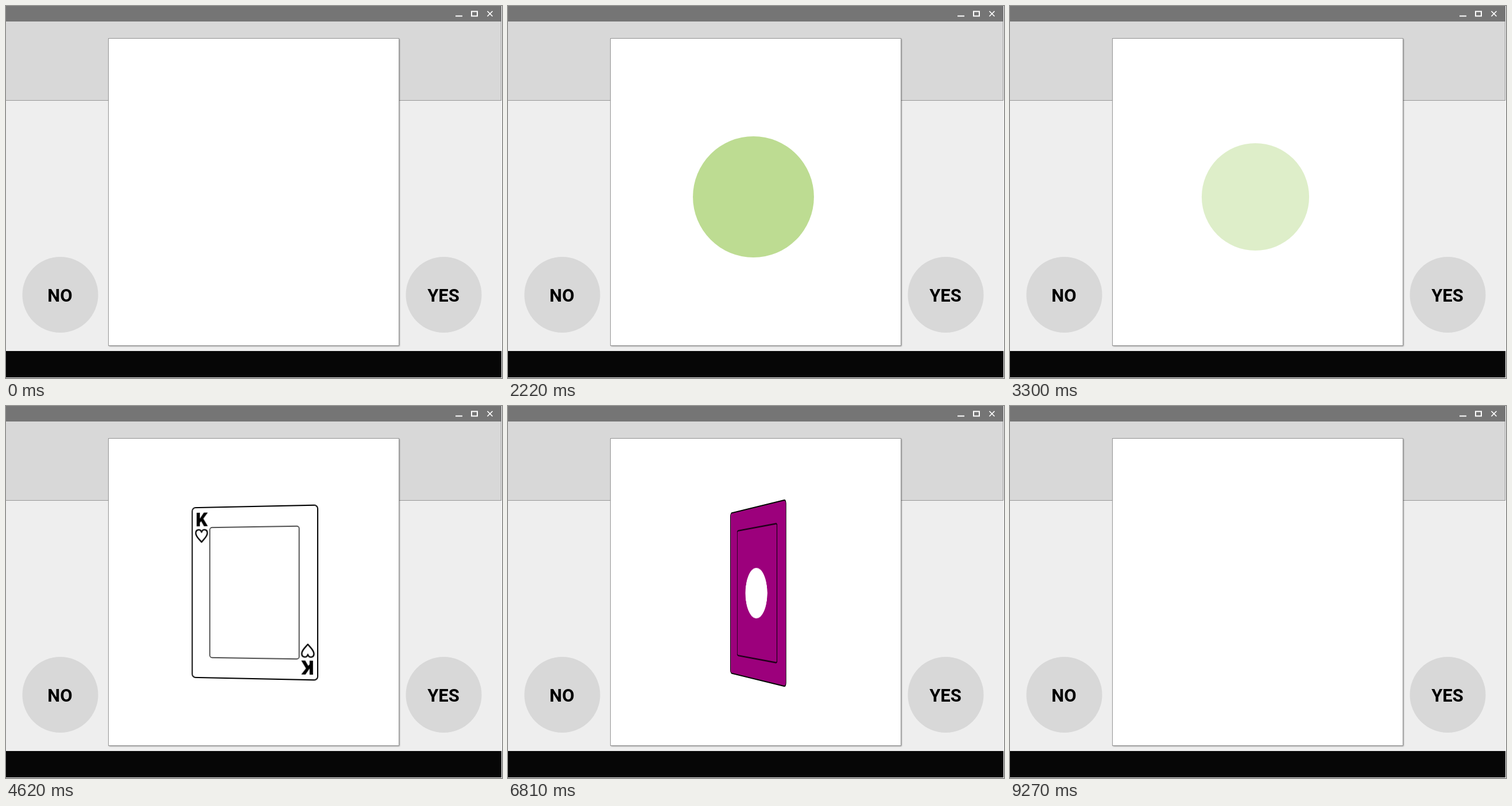
Write an HTML page that moves like this. It is 864 px wide and 648 px high and loops after 9660 ms.

```html
<!DOCTYPE html>
<html lang="en">
<head>
<meta charset="utf-8">
<title>Card reveal</title>
<style>
  html, body { margin: 0; width: 100%; height: 100%; overflow: hidden; background: #fff; }
  svg { display: block; overflow: visible; }
  #stage { position: absolute; left: 0; top: 0; }
  .label { font: 700 31px Roboto, Arial, sans-serif; text-anchor: middle; }
  .index { font: 900 34px Roboto, Arial, sans-serif; text-anchor: middle; }
  .card { position: absolute; left: 320px; width: 224px; height: 302px; visibility: hidden; }
  #front { top: 173.5px; }
  #back { top: 175px; }
</style>
</head>
<body>
<svg id="stage" width="864" height="648" viewBox="0 0 864 648">
  <defs>
    <filter id="soft" x="-5%" y="-5%" width="110%" height="110%">
      <feGaussianBlur stdDeviation="1"/>
    </filter>
  </defs>
  <rect width="863" height="648" fill="#eee"/>
  <rect x="-1" y="26.5" width="863.5" height="138" fill="#d8d8d8" stroke="#979797"/>
  <rect width="863" height="27" fill="#757575"/>
  <g fill="none" stroke="#fff" stroke-width="2">
    <path d="M783 17.5H795"/>
    <rect x="811" y="9.5" width="10" height="8"/>
    <path d="M838.5 9L847.5 18M847.5 9L838.5 18" stroke-width="1.7"/>
  </g>
  <rect y="601" width="863" height="46" fill="#060606"/>
  <circle cx="94.5" cy="503" r="66" fill="#d8d8d8"/>
  <circle cx="762.5" cy="503" r="66" fill="#d8d8d8"/>
  <text class="label" x="94" y="515">NO</text>
  <text class="label" x="762" y="515">YES</text>
  <rect x="179.5" y="57.5" width="506" height="535" fill="#000" opacity=".5" filter="url(#soft)"/>
  <rect x="178.5" y="56.5" width="506" height="535" fill="#fff" stroke="#979797"/>
  <circle id="badge" cx="427.5" cy="332.5" r="0" fill="#86bf37"/>
</svg>

<div class="card" id="front">
  <svg width="224" height="302" viewBox="-112 -151 224 302">
    <rect x="-111" y="-150" width="222" height="300" rx="6" fill="#fff" stroke="#000" stroke-width="2"/>
    <rect x="-79" y="-114.5" width="158" height="229" rx="4" fill="none" stroke="#111" stroke-width="1.4"/>
    <g id="corner">
      <text class="index" x="-94" y="-117">K</text>
      <path d="M-94 -89C-99 -95 -104.5 -99 -104.5 -105C-104.5 -112 -96 -113 -94 -106.5C-92 -113 -83.5 -112 -83.5 -105C-83.5 -99 -89 -95 -94 -89Z"
        fill="#fff" stroke="#000" stroke-width="2.4" stroke-linejoin="round"/>
    </g>
    <use href="#corner" transform="rotate(180)"/>
  </svg>
</div>
<div class="card" id="back">
  <svg width="224" height="302" viewBox="-112 -151 224 302">
    <rect x="-111" y="-150" width="222" height="300" rx="6" fill="#9c007c" stroke="#000" stroke-width="2"/>
    <rect x="-80" y="-114.5" width="160" height="229" rx="4" fill="none" stroke="#000" stroke-width="2"/>
    <circle r="44" fill="#fff"/>
  </svg>
</div>

<script>
  const LOOP = 9660;
  const byId = id => document.getElementById(id);
  const badge = byId('badge'), front = byId('front'), back = byId('back');

  // [time in ms, value]
  const badgeSize = [[390, 54], [2735, 435], [3130, 285], [3530, 348], [4380, 345]];
  const badgeFade = [[380, 1], [4380, 0]];
  const turn = [[4380, 0], [5340, 40.3], [5520, 49.5], [6360, 90], [6810, 115.6], [7320, 160], [7560, 180]];
  const cardFade = [[9120, 1], [9270, 0]];

  function along(keys, t) {
    if (t <= keys[0][0]) return keys[0][1];
    for (let i = 1; i < keys.length; i++) {
      const [t0, a] = keys[i - 1], [t1, b] = keys[i];
      if (t <= t1) return a + (b - a) * (t - t0) / (t1 - t0);
    }
    return keys[keys.length - 1][1];
  }

  function pose(card, visible, angle, alpha) {
    card.style.visibility = visible ? 'visible' : 'hidden';
    card.style.opacity = alpha;
    card.style.transform = `perspective(1270px) rotateY(${-angle}deg)`;
  }

  function draw(t) {
    const badgeOn = t >= 390 && t < 4380;
    badge.setAttribute('r', badgeOn ? 0.3 * along(badgeSize, t) : 0);
    badge.setAttribute('opacity', along(badgeFade, t));

    const cardOn = t >= 4380 && t < 9270;
    const angle = along(turn, t), alpha = along(cardFade, t);
    pose(front, cardOn && angle < 90, angle, alpha);
    pose(back, cardOn && angle >= 90, 180 - angle, alpha);
  }

  const start = performance.now();
  function tick() {
    draw((performance.now() - start) % LOOP);
    requestAnimationFrame(tick);
  }
  tick();
</script>
</body>
</html>
```
